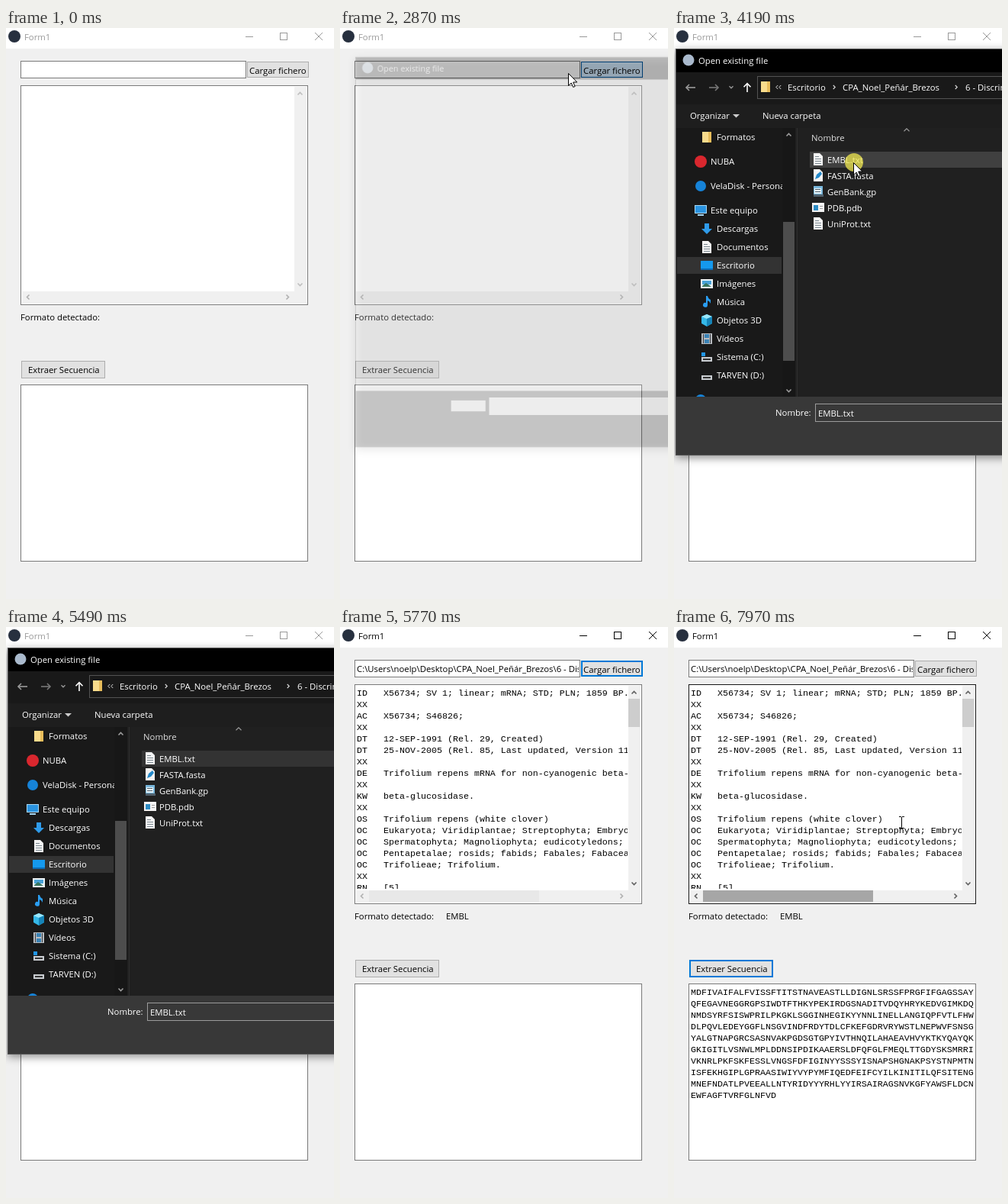
An HTML page with a canvas for the animation above (8 s loop, 430 by 748 pixels).

```html
<!DOCTYPE html>
<html lang="es">
<head>
<meta charset="utf-8">
<title>Form1</title>
<style>
html, body { margin: 0; width: 100%; height: 100%; overflow: hidden; background: #f0f0f0; }
canvas { display: block; }
</style>
</head>
<body>
<canvas id="stage" width="430" height="748"></canvas>
<script>
const DURATION = 8000;
const UI = '11.33px "Open Sans", "Noto Sans", sans-serif';
const MONO = '11.667px "Liberation Mono", monospace';
const screen = document.getElementById('stage').getContext('2d');
const layer = Object.assign(document.createElement('canvas'), { width: 890, height: 570 });
const dialog = layer.getContext('2d');
let g = screen;

const PATH = `C:\\Users\\noelp\\Desktop\\CPA_Noel_Peñár_Brezos\\6 - Discriminar Formatos\\EMBL.txt`;
const RECORD = `ID   X56734; SV 1; linear; mRNA; STD; PLN; 1859 BP.
XX
AC   X56734; S46826;
XX
DT   12-SEP-1991 (Rel. 29, Created)
DT   25-NOV-2005 (Rel. 85, Last updated, Version 11)
XX
DE   Trifolium repens mRNA for non-cyanogenic beta-glucosidase
XX
KW   beta-glucosidase.
XX
OS   Trifolium repens (white clover)
OC   Eukaryota; Viridiplantae; Streptophyta; Embryophyta;
OC   Spermatophyta; Magnoliophyta; eudicotyledons; core
OC   Pentapetalae; rosids; fabids; Fabales; Fabaceae;
OC   Trifolieae; Trifolium.
XX
RN   [5]`;
const SEQUENCE = `MDFIVAIFALFVISSFTITSTNAVEASTLLDIGNLSRSSFPRGFIFGAGSSAY
QFEGAVNEGGRGPSIWDTFTHKYPEKIRDGSNADITVDQYHRYKEDVGIMKDQ
NMDSYRFSISWPRILPKGKLSGGINHEGIKYYNNLINELLANGIQPFVTLFHW
DLPQVLEDEYGGFLNSGVINDFRDYTDLCFKEFGDRVRYWSTLNEPWVFSNSG
YALGTNAPGRCSASNVAKPGDSGTGPYIVTHNQILAHAEAVHVYKTKYQAYQK
GKIGITLVSNWLMPLDDNSIPDIKAAERSLDFQFGLFMEQLTTGDYSKSMRRI
VKNRLPKFSKFESSLVNGSFDFIGINYYSSSYISNAPSHGNAKPSYSTNPMTN
ISFEKHGIPLGPRAASIWIYVYPYMFIQEDFEIFCYILKINITILQFSITENG
MNEFNDATLPVEEALLNTYRIDYYYRHLYYIRSAIRAGSNVKGFYAWSFLDCN
EWFAGFTVRFGLNFVD`;

// Icons are centred on the origin: [colour, path] layers.
const PAGE = ['#f4f4f4', 'M-6-8h8l4 4v12h-12z'];
const DRIVE = ['#c8ccd0', 'M-7 0h14v6h-14z'];
const ICONS = {
  page: [PAGE, ['#aaa', 'M2-8v4h4z']],
  folder: [['#e8bd5b', 'M-6-7h12v14h-12z'], ['#f9dc8c', 'M-6-7h8v14h-8z']],
  red: [['#d9272e', 'M-8 0a8 8 0 1 0 16 0a8 8 0 1 0-16 0']],
  blue: [['#1683d8', 'M-7 0a7 7 0 1 0 14 0a7 7 0 1 0-14 0']],
  pc: [['#a8d8f5', 'M-8-7h16v11h-16zM-4 5h8v2h-8z'], ['#2a93e0', 'M-7-6h14v9h-14z']],
  down: [['#2f9bea', 'M-3-7h6v7h4l-7 7l-7-7h4z']],
  text: [PAGE, ['#7a8790', 'M-4-4h5v1h-5zM-4-1h8v1h-8zM-4 2h8v1h-8zM-4 5h8v1h-8z']],
  desk: [['#1599ee', 'M-8-6h16v12h-16z'], ['#0b6bb5', 'M-8 4h16v2h-16z']],
  image: [['#eef5f8', 'M-8-6h16v12h-16z'], ['#4aa3d8', 'M-6-4h12v5h-12z'], ['#37755f', 'M-6 3l5-4l7 5h-12z']],
  music: [['#2a9df0', 'M-1-8h2q1 4 4 5v5q-1-3-4-4v6a3 3 0 1 1-2-3z']],
  cube: [['#35b8e8', 'M0-8l7 3v9l-7 4l-7-4v-9z'], ['#9be6fa', 'M0-8l7 3l-7 3l-7-3z'], ['#1684b8', 'M0-2l7-3v9l-7 4z']],
  film: [['#b8bcc0', 'M-7-7h14v14h-14z'], ['#33373c', 'M-5-6h1v12h-1zM4-6h1v12h-1z'], ['#3b83b5', 'M-3-6h6v5h-6zM-3 1h6v5h-6z']],
  system: [DRIVE, ['#2196e8', 'M-7-6h5v5h-5z'], ['#333', 'M-5 2h10v2h-10z']],
  drive: [DRIVE, ['#333', 'M-5 2h10v2h-10z']],
  code: [PAGE, ['#2489ca', 'M-4 5l2-6l5-4l2 3l-4 5z']],
  note: [['#79b7dc', 'M-6-7h12v14h-12z'], ['#e8f4fa', 'M-5-4h9v7h-9z'], ['#51616d', 'M-4-3h7v1h-7zM-4 0h7v1h-7zM-6 4h13v3h-13z']],
  app: [['#f4f4f4', 'M-8-6h16v12h-16z'], ['#2d8cc4', 'M-6-3h6v7h-6z'], ['#999', 'M2-2h4v1h-4zM2 1h4v1h-4z']],
  pin: [['#9b9b9b', 'M1-6l5 5l-2 1l-2 2l-1 3l-3-3l-4 4l3-5l-2-2l3-1l2-2z']]
};
for (const kind in ICONS) ICONS[kind] = ICONS[kind].map(([c, d]) => [c, new Path2D(d)]);

// Sidebar rows: label, icon, is a group heading
const QUICK = [['Acceso rápido', '', 1], ['Escritorio', 'desk'], ['Descargas', 'down'], ['Documentos', 'text'],
  ['Imágenes', 'image'], ['1 - Cuaderno', 'folder'], ['6 - Discriminar Formatos', 'folder'],
  ['Datos ejemplo', 'folder'], ['Formatos', 'folder'], ['NUBA', 'red', 1], ['VelaDisk - Personal', 'blue', 1],
  ['Este equipo', 'pc', 1]];
const COMPUTER = [['Descargas', 'down'], ['Documentos', 'text'], ['Escritorio', 'desk'], ['Imágenes', 'image'],
  ['Música', 'music'], ['Objetos 3D', 'cube'], ['Vídeos', 'film'], ['Sistema (C:)', 'system'], ['TARVEN (D:)', 'drive']];
const NETWORK = [['Red', 'blue', 1]];
const FILES = [['EMBL.txt', 'text'], ['FASTA.fasta', 'code'], ['GenBank.gp', 'note'], ['PDB.pdb', 'app'], ['UniProt.txt', 'text']];

// Pointer keys: time, x, y
const POINTER = [[0, 440, 740], [99, 440, 740], [100, 396, 726], [500, 368, 480], [870, 350, 150], [940, 350, 140],
  [1160, 347, 71], [1340, 347, 71], [1600, 340, 57], [2340, 340, 57], [2600, 299, 59], [3750, 299, 59],
  [3910, 235, 176], [4350, 235, 176], [4670, 440, 330], [6229, 440, 330], [6230, 399, 330], [6450, 300, 300],
  [6700, 170, 370], [7000, 75, 447], [7550, 75, 447], [7970, 298, 256], [8000, 298, 256]];
const CLICKS = [[1650, 1950], [4190, 4330], [7070, 7270]];

const clamp = v => Math.max(0, Math.min(1, v));
const between = (t, a, b) => t >= a && t < b;

function rect(x1, y1, x2, y2, color) {
  g.fillStyle = color;
  g.fillRect(x1, y1, x2 - x1, y2 - y1);
}
function box(x1, y1, x2, y2, fill, border, width = 1) {
  rect(x1, y1, x2, y2, border);
  rect(x1 + width, y1 + width, x2 - width, y2 - width, fill);
}
function text(s, x, y, color = '#000', font = UI) {
  g.font = font;
  g.fillStyle = color;
  g.fillText(s, x, y);
}
function lines(s, x, y) {
  s.split('\n').forEach((line, i) => text(line, x, y + i * 15, '#000', MONO));
}
function line(color, width, ...p) {
  g.strokeStyle = color;
  g.lineWidth = width;
  g.beginPath();
  for (let i = 0; i < p.length; i += 2) g.lineTo(p[i], p[i + 1]);
  g.stroke();
}
function chevron(x, y, dx, dy, color, size = 3, width = 1.6) {
  const px = dy * size, py = dx * size, ox = dx * size / 2, oy = dy * size / 2;
  line(color, width, x - ox - px, y - oy - py, x + ox, y + oy, x - ox + px, y - oy + py);
}
function disc(x, y, r, color) {
  g.fillStyle = color;
  g.beginPath();
  g.arc(x, y, r, 0, 7);
  g.fill();
}
function clipped(x1, y1, x2, y2, draw) {
  g.save();
  g.beginPath();
  g.rect(x1, y1, x2 - x1, y2 - y1);
  g.clip();
  draw();
  g.restore();
}
function icon(kind, x, y) {
  if (!kind) return;
  g.save();
  g.translate(x, y);
  for (const [color, path] of ICONS[kind]) {
    g.fillStyle = color;
    g.fill(path);
  }
  g.restore();
}
function button(x1, y1, x2, y2, label, textX, state) {
  const [fill, border, width] = {
    normal: ['#e1e1e1', '#adadad', 1], hover: ['#e5f1fb', '#0078d7', 1],
    pressed: ['#cce4f7', '#005499', 1], focus: ['#e1e1e1', '#0078d7', 2]
  }[state];
  box(x1, y1, x2, y2, fill, border, width);
  text(label, textX, y1 + 15.5);
}

function pointerAt(t) {
  const i = POINTER.findIndex(k => k[0] > t);
  const [t0, x0, y0] = POINTER[i - 1], [t1, x1, y1] = POINTER[i];
  const p = (t - t0) / (t1 - t0);
  return [x0 + (x1 - x0) * p, y0 + (y1 - y0) * p];
}

function drawForm(t, [mx, my]) {
  const inside = (x1, y1, x2, y2) => mx >= x1 && mx < x2 && my >= y1 && my < y2;
  const active = between(t, 1600, 1960) || t >= 5690;
  const loaded = t >= 5560, done = t >= 7340;
  const ink = active ? '#000' : '#999';

  rect(0, 0, 430, 748, '#f0f0f0');
  rect(0, 0, 430, 27, '#fff');
  disc(11, 11, 8, '#27303f');
  text('Form1', 24, 16, ink);
  rect(314, 11, 324, 12, ink);
  g.strokeStyle = ink;
  g.lineWidth = 1;
  g.strokeRect(359.5, 6.5, 9, 9);
  line(ink, 1, 405, 6, 415, 16);
  line(ink, 1, 415, 6, 405, 16);

  box(19, 43, 315, 66, '#fff', '#7a7a7a');
  if (loaded) clipped(21, 45, 313, 64, () => text(PATH, 22, 58.5));
  const load = between(t, 1650, 5600) ? 'pressed' : between(t, 5600, 7130) ? 'focus'
    : inside(316, 44, 397, 65) ? 'hover' : 'normal';
  button(316, 44, 397, 65, 'Cargar fichero', 319, load);

  const hover1 = inside(19, 75, 396, 363);
  box(19, 75, 396, 363, '#fff', hover1 ? '#171717' : '#7a7a7a');
  rect(378, 77, 394, 361, '#f0f0f0');
  rect(21, 345, 378, 361, '#f0f0f0');
  const vInk = loaded ? '#606060' : '#bfbfbf';
  const hInk = t >= 5900 ? '#606060' : '#b0b0b0';
  chevron(385.5, 86, 0, -1, vInk);
  chevron(385.5, 336, 0, 1, vInk);
  chevron(29, 352.5, -1, 0, hInk);
  chevron(369, 352.5, 1, 0, hInk);
  if (loaded) {
    rect(378, 94, 393, 131, '#cdcdcd');
    rect(38, 345, 261, 360, t < 5830 ? '#e8e8e8' : t > 7700 ? '#a6a6a6' : '#cdcdcd');
    clipped(21, 77, 377, 343, () => lines(RECORD, 22, 90));
  }

  text('Formato detectado:', 19, 383);
  if (loaded) text('EMBL', 139, 383);

  const over = inside(20, 436, 130, 459);
  const extract = between(t, 7130, 7270) ? 'pressed' : over ? 'hover' : t >= 7130 ? 'focus' : 'normal';
  button(20, 436, 130, 459, 'Extraer Secuencia', 29, extract);

  box(19, 467, 396, 699, '#fff', inside(19, 467, 396, 699) ? '#171717' : '#7a7a7a');
  if (done) lines(SEQUENCE, 22, 482);
}

function drawSidebar(ready, scrolled) {
  rect(3, 131, 159, 483, '#191919');
  const rows = scrolled ? [...QUICK, ...COMPUTER, ...NETWORK] : [...QUICK, ...NETWORK];
  const selected = scrolled ? 14 : 11;
  clipped(3, 131, 142, 483, () => {
    let y = scrolled ? -81 : 127;
    rows.forEach(([label, kind, group], i) => {
      y += group ? 32 : 24;
      if (i === selected) rect(4, y - 11, 141, y + 11, '#333');
      if (ready) icon(kind, group ? 35 : 43, y);
      else if (!group) icon('page', 43, y);
      text(label, group ? 48 : 56, y + 4, '#fff');
      if (between(i, 1, 5)) icon('pin', 134, y);
    });
  });
  rect(142, 131, 159, 483, '#171717');
  rect(143, scrolled ? 254 : 148, 158, scrolled ? 436 : 433, '#4d4d4d');
  chevron(150.5, 140, 0, -1, '#9b9b9b');
  chevron(150.5, 475, 0, 1, '#9b9b9b');
}

function drawBrowser(t, [mx, my]) {
  rect(3, 58, 887, 100, '#191919');
  rect(3, 100, 887, 131, '#1e1e1e');
  rect(159, 131, 887, 483, '#202020');
  rect(161, 131, 162, 483, '#2f2f2f');

  for (const [x, dir, color] of [[22, -1, '#9b9b9b'], [52, 1, '#777']]) {
    line(color, 1.6, x - 6, 78, x + 6, 78);
    chevron(x + dir * 4, 78, dir, 0, color, 4);
  }
  chevron(75, 77.5, 0, 1, '#9b9b9b', 2.5, 1.3);
  line('#fff', 1.6, 96, 84, 96, 73);
  chevron(96, 75, 0, -1, '#fff', 4.5);
  box(109, 63, 700, 93, '#191919', '#535353');
  icon('folder', 120, 77);
  chevron(135, 77.5, -1, 0, '#ddd', 2.5, 1);
  chevron(139, 77.5, -1, 0, '#ddd', 2.5, 1);
  text('Escritorio', 149, 81.5, '#fff');
  chevron(210, 77.5, 1, 0, '#ddd', 2.5, 1.1);
  text('CPA_Noel_Peñár_Brezos', 221, 81.5, '#fff');
  chevron(370, 77.5, 1, 0, '#ddd', 2.5, 1.1);
  text('6 - Discriminar Formatos', 382, 81.5, '#fff');

  text('Organizar', 21, 119, '#fff');
  g.fillStyle = '#ccc';
  g.fill(new Path2D('M77 113h9l-4.5 4.5z'));
  text('Nueva carpeta', 116, 119, '#fff');
  text('Nombre', 180, 148, '#ddd');
  chevron(305, 133.5, 0, -1, '#9b9b9b', 3.5, 1.1);

  const chosen = t >= 4190;
  FILES.forEach(([label, kind], i) => {
    const y = 173 + i * 21;
    const hot = mx > 178 && Math.abs(my - y) < 10.5;
    if (hot || (chosen && !i)) rect(178, y - 11, 700, y + 10, hot && chosen && !i ? '#404040' : '#333');
    icon(kind, 189, y - 1);
    text(label, 201, y + 4, '#fff');
  });
}

function drawDialog(t, pointer) {
  const painted = t >= 3480;
  g.clearRect(0, 0, 890, 570);
  rect(2, 27, 888, 560, '#555');
  rect(3, 28, 887, 58, '#000');
  rect(3, 58, 887, 483, '#fff');
  disc(19, 42, 7.5, '#a9b9cc');
  text('Open existing file', 32, 47, '#fff');
  if (painted) drawBrowser(t, pointer);
  if (t >= 3410) drawSidebar(painted, t >= 3550);
  rect(3, 483, 887, 559, '#383838');
  if (painted) {
    text('Nombre:', 133, 508, '#fff');
    box(185, 492, 700, 516, '#383838', '#9b9b9b');
    if (t >= 4190) text('EMBL.txt', 189, 508.5, '#fff');
    else if (t < 4050) rect(189, 497, 190, 512, '#fff');
  } else {
    rect(133, 496, 180, 511, '#fff');
    rect(185, 492, 700, 516, '#fff');
  }
}

function showDialog(t, pointer) {
  const opening = clamp((t - 2800) / 350), closing = clamp((t - 5500) / 190);
  const alpha = opening * (1 - closing);
  if (!alpha) return;
  g = dialog;
  drawDialog(t, pointer);
  g = screen;
  const scale = 0.9 + 0.1 * (1 - (1 - opening) ** 4) - 0.1 * closing;
  g.save();
  g.globalAlpha = alpha;
  g.translate(445, 293);
  g.scale(scale, scale);
  g.shadowColor = 'rgba(0,0,0,.45)';
  g.shadowBlur = 12;
  g.shadowOffsetY = 3;
  g.drawImage(layer, -445, -293);
  g.restore();
}

function drawPointer(t, [x, y]) {
  if (CLICKS.some(([a, b]) => between(t, a, b))) disc(x + 1, y, 12, 'rgba(240,232,80,.75)');
  const modal = between(t, 2340, 5690);
  const onText = x > 20 && ((x < 378 && y > 76 && y < 345) || (x < 395 && y > 468 && y < 698));
  if (onText && !modal) {
    x = Math.round(x);
    y = Math.round(y);
    rect(x, y - 7, x + 1, y + 8, '#000');
    for (const end of [y - 8, y + 7]) {
      rect(x - 3, end, x, end + 1, '#000');
      rect(x + 1, end, x + 4, end + 1, '#000');
    }
    return;
  }
  g.save();
  g.translate(x + 0.5, y + 0.5);
  const arrow = new Path2D('M0 0V16L3.7 12.5L6.2 18L8.6 17L6.2 11.5H11.3Z');
  g.fillStyle = '#fff';
  g.fill(arrow);
  g.strokeStyle = '#000';
  g.lineWidth = 1;
  g.stroke(arrow);
  g.restore();
}

function frame() {
  const t = performance.now() % DURATION;
  const pointer = pointerAt(t);
  drawForm(t, pointer);
  showDialog(t, pointer);
  drawPointer(t, pointer);
  requestAnimationFrame(frame);
}
frame();
</script>
</body>
</html>
```
